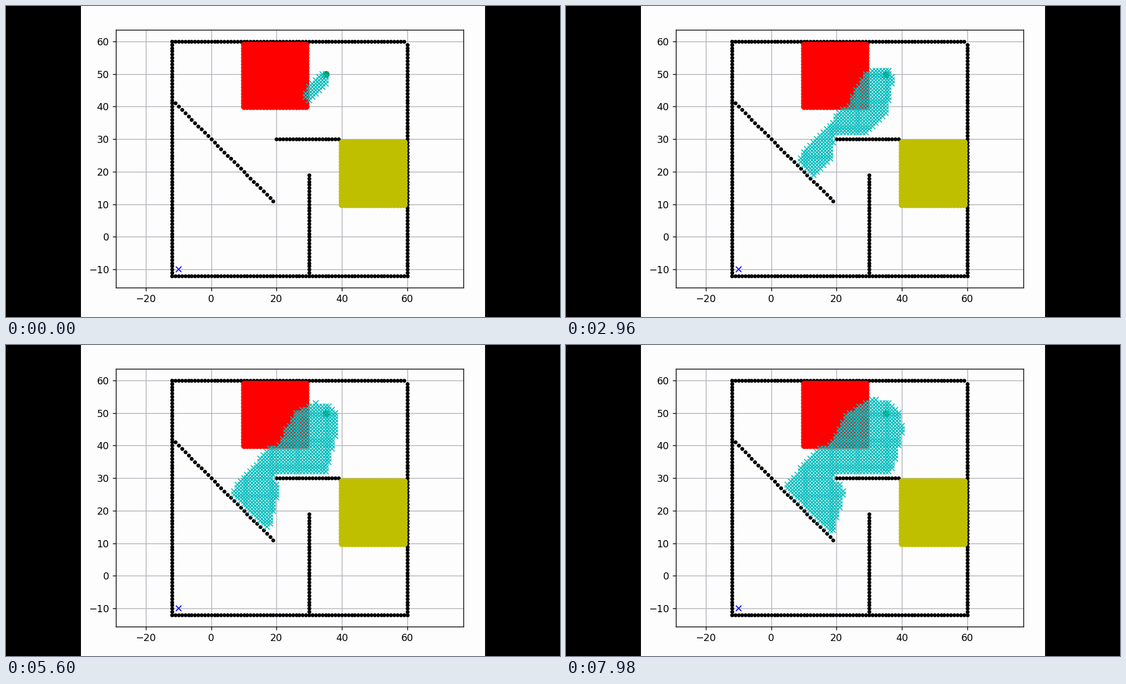
These frames come from a looping animation (998 by 561 pixels, 8000 ms). A matplotlib script:

```python
import math
import numpy as np
import matplotlib.pyplot as plt
from matplotlib.animation import FuncAnimation
from matplotlib.patches import Rectangle

W, H, DPI = 998, 561, 128
PT = 126 / DPI                      # plot scale in points
STEP, FRAMES = 20, 400
START, GOAL = (35, 50), (-10, -10)
EXTRA = 0.25                        # added cost per unit inside an area

# Obstacles and cost areas
walls = [(x, -12) for x in range(-12, 61)]
walls += [(60, y) for y in range(-12, 60)]
walls += [(x, 60) for x in range(-12, 60)]
walls += [(-12, y) for y in range(-12, 61)]
walls += [(x, 30 - x) for x in range(-11, 20)]
walls += [(x, 30) for x in range(20, 40)]
walls += [(30, y) for y in range(-12, 20)]
red = [(x, y) for x in range(10, 30) for y in range(40, 60)]
yellow = [(x, y) for x in range(40, 60) for y in range(10, 30)]

blocked = {(x + dx, y + dy) for x, y in walls
           for dx, dy in ((0, 0), (1, 0), (-1, 0), (0, 1), (0, -1))}
costly = set(red) | set(yellow)
MOVES = [(1, 0), (0, 1), (-1, 0), (0, -1), (-1, -1), (-1, 1), (1, -1), (1, 1)]


def search(limit):
    """A* on the grid; returns the cells in the order they are closed."""
    frontier, closed = {START: 0.0}, {}

    def score(cell):
        return frontier[cell] + math.hypot(cell[0] - GOAL[0], cell[1] - GOAL[1])

    while frontier and len(closed) < limit:
        cell = min(frontier, key=score)
        cost = closed[cell] = frontier.pop(cell)
        if cell == GOAL:
            break
        for dx, dy in MOVES:
            nxt = (cell[0] + dx, cell[1] + dy)
            if nxt in blocked or nxt in closed:
                continue
            rate = 1 + EXTRA * (nxt in costly)
            new = cost + rate * math.hypot(dx, dy)
            if new < frontier.get(nxt, math.inf):
                frontier[nxt] = new
    return np.array(list(closed))


visited = search(700)

# Cells shown against the picture count; the view refreshes every ten cells
TICKS = [1, 12, 41, 65, 108, 137, 172]
CELLS = [31, 101, 211, 321, 471, 561, 651]


def shown(frame):
    turn, rest = divmod(frame * STEP + 20, 140)
    tick = 3 * turn + min(rest // 20, 2)
    return int(np.interp(tick, TICKS, CELLS) - 1) // 10 * 10 + 1


# Stage
fig = plt.figure(figsize=(W / DPI, H / DPI), dpi=DPI, facecolor="black")
fig.add_artist(Rectangle((135 / W, 0), 728 / W, 1, color="#fdfdfd", lw=0, zorder=-1))
left, right, top, bottom = 198.1, 823.6, 42.6, 508.2
ax = fig.add_axes([left / W, 1 - bottom / H, (right - left) / W, (bottom - top) / H],
                  facecolor="#fdfdfd")
ax.set_xlim(-29.17, 77.17)
ax.set_ylim(-15.6, 63.6)
ax.set_xticks(range(-20, 61, 20))
ax.set_yticks(range(-10, 61, 10))
ax.grid(True, color="#b0b0b8", lw=0.8 * PT)
ax.tick_params(labelsize=10 * PT, length=3.5 * PT, width=0.8 * PT, pad=3.5 * PT,
               labelfontfamily="DejaVu Sans")
for spine in ax.spines.values():
    spine.set_linewidth(0.8 * PT)


def dots(cells, marker, color, size=6):
    xs, ys = zip(*cells)
    return ax.plot(xs, ys, marker, color=color, ms=size * PT, mew=PT)[0]


dots(walls, ".", "k")
dots([START], "o", "g")
dots([GOAL], "x", "b")
dots(red, "o", "r")
dots(yellow, "o", "y")
trail = dots([START], "x", "c")


def draw(frame):
    trail.set_data(*visited[:shown(frame)].T)
    return trail,


anim = FuncAnimation(fig, draw, frames=FRAMES, interval=STEP, repeat=True,
                     repeat_delay=0, blit=False)
plt.show()
```
